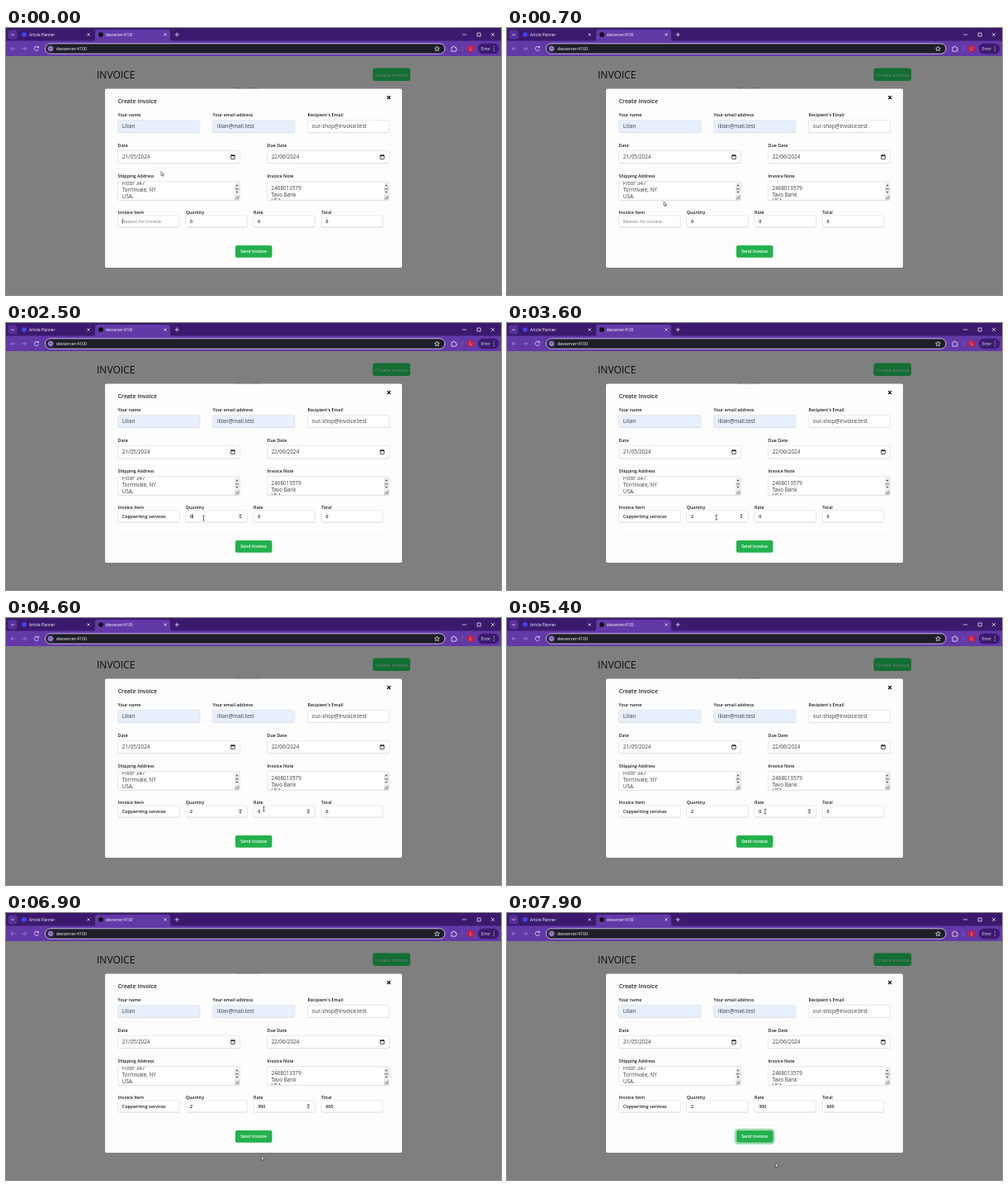
An HTML page for the animation above (8 s loop, 600x323 px).

```html
<!DOCTYPE html>
<html lang="en">
<head>
<meta charset="utf-8">
<title>Create invoice</title>
<style>
html, body { margin: 0; width: 100%; height: 100%; overflow: hidden; background: #7f7f7f; }
svg { display: block; width: 100vw; height: 100vh; }
text { font-family: "Open Sans", "Noto Sans", sans-serif; white-space: pre; }
.label { font-size: 5.3px; font-weight: 600; fill: #1c1c1c; }
.value { font-size: 6.35px; fill: #3c3c3c; }
.entry { font-size: 5.35px; font-weight: 600; fill: #1c1c1c; }
.hint { font-size: 5.5px; font-weight: 500; fill: #777; }
.tab { font-size: 4.6px; font-weight: 500; fill: #fff; }
.line { fill: none; stroke: #fff; stroke-width: .7; }
</style>
</head>
<body>
<svg id="stage" viewBox="0 0 600 323" xmlns="http://www.w3.org/2000/svg">
  <defs>
    <clipPath id="areas"><path d="M136 186h147v22H136zM317 186h147v22H317z"/></clipPath>
    <g id="calendar">
      <rect x="-2.3" y="-2" width="4.6" height="4.6" rx=".4" fill="none" stroke="#111" stroke-width=".7"/>
      <path d="M-2.3-1.4h4.6M-1.3-3v1M1.3-3v1" stroke="#111" stroke-width="1"/>
    </g>
    <g id="scroller">
      <path d="M-3-10.5h6v16h-6z" fill="#f0f0f0"/>
      <path d="M-1.8-5.6L0-7.6 1.8-5.6zM-1.8 1L0 3 1.8 1z" fill="#555"/>
      <path d="M-2.2-3.4h4.4v2.6h-4.4z" fill="#aaa"/>
      <path d="M-2.8 5.6h5.6v5.4h-5.6z" fill="#ddd"/>
      <path d="M-2 10.5L2.5 6M.3 10.5L2.5 8.3" stroke="#666" stroke-width=".8"/>
    </g>
    <g id="spinner">
      <path d="M-2.5-3.2h5v6.4h-5z" fill="#ededed"/>
      <path d="M-1.5-.7L0-2.5 1.5-.7zM-1.5.7L0 2.5 1.5.7z" fill="#444"/>
    </g>
  </defs>

  <rect width="600" height="323" fill="#7f7f7f"/>
  <rect width="600" height="17" fill="#3b1a6e"/>
  <rect y="15.5" width="600" height="18.5" fill="#6339a8"/>
  <path d="M105 16q3 0 3-3V5q0-3 3-3h85q3 0 3 3v8q0 3 3 3z" fill="#6339a8"/>
  <rect x="2.5" y="2.5" width="11" height="11" rx="3" fill="#56319a"/>
  <path class="line" d="M6.2 7.2l1.8 1.8 1.8-1.8"/>
  <rect x="19.5" y="5.5" width="5" height="5" rx="1" fill="#4945ff"/>
  <text class="tab" x="28" y="9.7">Article Planner</text>
  <circle cx="115" cy="8" r="2.8" fill="#0a0a0a"/>
  <text class="tab" x="120.7" y="9.7">devserver:4100</text>
  <path class="line" d="M98.5 6.5l3 3m0-3l-3 3M191.5 6.5l3 3m0-3l-3 3M204.7 8h5M207.2 5.5v5M553 8h5M571.2 6h4v4h-4zM588 6l4 4m0-4l-4 4"/>

  <path class="line" opacity=".45" d="M11 25H6m2.4-2.4L6 25l2.4 2.4M19.5 25h5m-2.4-2.4l2.4 2.4-2.4 2.4"/>
  <path class="line" d="M39 23.3a2.6 2.6 0 1 0 .4 2.5M39.5 22v1.8h-1.8"/>
  <rect x="47.5" y="18.8" width="484.5" height="12.4" rx="6.2" fill="#1e1e28" stroke="#cdb9ef"/>
  <circle cx="54" cy="25" r="4" fill="#533488"/>
  <circle class="line" cx="54" cy="25" r="2.2"/>
  <path class="line" d="M54 24.7v1.3"/>
  <text x="61" y="26.9" font-size="5.2" fill="#fff">devserver:4100</text>
  <path class="line" d="M522.5 22.2l.9 1.9 2 .2-1.5 1.4.4 2-1.8-1-1.8 1 .4-2-1.5-1.4 2-.2z"/>
  <path class="line" d="M540 23.3h1.6q0-1.4 1.2-1.4t1.2 1.4h1.4v1.5q1.2 0 1.2 1t-1.2 1v1.4H540z"/>
  <path d="M553 21v8" stroke="#8a67c5" stroke-width=".6"/>
  <circle cx="563.3" cy="25" r="4.2" fill="#c9213e"/>
  <text x="563.3" y="26.6" font-size="4.5" fill="#fff" text-anchor="middle">L</text>
  <rect x="572" y="18.7" width="25.5" height="12.6" rx="6.3" fill="#3b1a6e"/>
  <text x="576" y="26.7" font-size="4.7" fill="#fff">Error</text>
  <path d="M591.5 22.5v.01M591.5 25v.01M591.5 27.5v.01" stroke="#fff" stroke-linecap="round" stroke-width="1.1"/>

  <text x="110" y="60.5" font-size="12" fill="#0c0c0c">INVOICE</text>
  <rect x="444.5" y="48.5" width="45.5" height="15.5" rx="3" fill="#126e32"/>
  <text x="467.3" y="58.7" font-size="6.1" fill="#808080" text-anchor="middle">Create invoice</text>
  <text x="279.5" y="76.2" font-size="5.6" fill="#222">Invoice list</text>

  <rect x="120" y="73.5" width="360" height="216.5" rx="1.8" fill="#fdfdfd"/>
  <text x="135.7" y="91.3" font-size="6.9" font-weight="600" fill="#222">Create Invoice</text>
  <path d="M462.2 82.2l3.8 3.8m0-3.8l-3.8 3.8" stroke="#000" stroke-width="1.2"/>
  <path d="M135.5 256.5h330" stroke="#ececec" stroke-width=".6" stroke-dasharray="1.2 .8"/>
  <g id="form"></g>
  <g clip-path="url(#areas)">
    <text class="value" x="140.8" y="190.1">Floor 347</text>
    <text class="value" x="140.8" y="198.1">Torrinvale, NY</text>
    <text class="value" x="140.8" y="206">USA.</text>
    <text class="value" x="321.5" y="195.5">2468013579</text>
    <text class="value" x="321.5" y="203.5">Tavo Bank</text>
    <text class="value" x="321.5" y="211.4">USA</text>
    <use href="#scroller" x="280" y="196.8"/>
    <use href="#scroller" x="461" y="196.8"/>
  </g>
  <use href="#calendar" x="275" y="156"/>
  <use href="#calendar" x="456" y="156"/>
  <use id="spinQty" href="#spinner" x="284" y="233.8"/>
  <use id="spinRate" href="#spinner" x="366.5" y="233.8"/>
  <path id="caret" d="M0 230.8v6" stroke="#111" stroke-width=".6"/>

  <rect id="ring" x="276.7" y="261.8" width="46.6" height="17.2" rx="2.8" fill="#fff" stroke="#35b45c" stroke-width=".9"/>
  <rect x="278" y="263" width="44.5" height="14.8" rx="2" fill="#22b14c"/>
  <text x="300.1" y="272.4" font-size="5.25" font-weight="600" fill="#fff" text-anchor="middle">Send Invoice</text>

  <g id="mouse">
    <path id="arrow" d="M0 0v5l1.2-1 .8 1.9.9-.4-.8-1.8h1.5z" fill="#fff" stroke="#111" stroke-width=".5"/>
    <path id="beam" d="M-1.2-2.8h2.4M0-2.8v5.6M-1.2 2.8h2.4" stroke="#111" stroke-width=".6"/>
    <path id="hand" d="M-.6.2q.6-.6 1.1 0v2.2l2 .5q.6.2.5.9l-.4 2.2h-3l-1.7-2.2q.2-.8 1.5 0z" fill="#fff" stroke="#111" stroke-width=".5"/>
  </g>
</svg>
<script>
const $ = id => document.getElementById(id);
const form = $('form');

function add(tag, attrs, text) {
  const el = document.createElementNS('http://www.w3.org/2000/svg', tag);
  for (const k in attrs) el.setAttribute(k, attrs[k]);
  if (text) el.textContent = text;
  return form.appendChild(el);
}

// Labelled input box; returns its text element.
function field(label, x, y, w, h, value = '', fill = '#fff', cls = 'value') {
  const small = cls === 'entry';
  add('text', { class: 'label', x, y: y - (small ? 1.8 : 5) }, label);
  add('rect', { x: x + .1, y: y + .8, width: w, height: h, rx: 1.6, fill: '#dcdcdc' });
  add('rect', { x, y, width: w, height: h, rx: 1.6, fill, stroke: '#dfe2e7', 'stroke-width': .7 });
  return add('text', { class: cls, x: x + 5.2, y: y + h / 2 + (small ? 2 : 2.4) }, value);
}

field('Your name', 135.6, 111.5, 99.4, 14.8, 'Lilian', '#e8f0fe');
field('Your email address', 250.6, 111.5, 99.4, 14.8, 'lilian@mail.test', '#e8f0fe');
field("Recipient's Email", 365.6, 111.5, 99, 14.8, 'our-shop@invoice.test');
field('Date', 135.6, 148.5, 148, 15, '21/05/2024');
field('Due Date', 316.5, 148.5, 148, 15, '22/06/2024');
field('Shipping Address', 135.6, 185.5, 148, 22.8);
field('Invoice Note', 316.5, 185.5, 148, 22.8);
const [item, qty, rate, total] = ['Invoice Item', 'Quantity', 'Rate', 'Total'].map(
  (name, i) => field(name, 135.6 + i * 82.2, 226.8, 74.5, 14, '', '#fff', 'entry'));

const LOOP = 8000;
const SERVICE = 'Copywriting services';
// time, x, y
const path = [
  [0, 188, 173.5], [200, 188, 175], [1000, 191, 226], [1500, 189, 235.4], [2150, 190, 235.4],
  [2450, 239.5, 236], [3400, 239.5, 236], [4100, 311, 232], [4600, 312.5, 231],
  [5000, 313, 234], [6300, 313, 234], [6900, 309.5, 294], [7050, 309, 295],
  [7300, 304, 271], [7500, 304, 271], [7900, 325.5, 302.5], [8000, 325.5, 302.5]
];
const areas = [
  [135, 111, 465, 127], [135, 148, 284, 164], [316, 148, 465, 164], [135, 185, 284, 209],
  [135, 226, 211, 241], [217, 226, 293, 241], [300, 226, 375, 241], [382, 226, 457, 241]
];
const inside = (x, y, [l, t, r, b]) => x > l && x < r && y > t && y < b;
const show = (el, on) => { el.style.display = on ? '' : 'none'; };
// Latest value of a list of [time, value] steps.
const step = (t, list) => list.filter(s => s[0] <= t).pop()[1];

function pointer(t) {
  const i = path.findIndex(p => p[0] > t);
  const [t0, x0, y0] = path[i - 1], [t1, x1, y1] = path[i];
  const u = (t - t0) / (t1 - t0), e = u * u * (3 - 2 * u);
  return [x0 + (x1 - x0) * e, y0 + (y1 - y0) * e];
}

function draw(now) {
  const t = now % LOOP;
  const [x, y] = pointer(t);
  const typed = SERVICE.slice(0, Math.max(0, Math.floor((t - 1600) / 27)));
  item.textContent = typed || 'Reason for invoice';
  item.setAttribute('class', typed ? 'entry' : 'hint');
  qty.textContent = step(t, [[0, '0'], [3000, '2']]);
  rate.textContent = step(t, [[0, '0'], [5500, '3'], [5800, '30'], [6200, '300']]);
  total.textContent = step(t, [[0, '0'], [5600, '6'], [5900, '60'], [6300, '600']]);

  const focus = step(t, [[0, item], [2450, qty], [4800, rate], [7400, null]]);
  const lit = step(t, [0, 1600, 2100, 2450, 3000, 4800, 5500, 5800, 6200].map(k => [k, k]));
  show($('caret'), focus && Math.floor((t - lit) / 500) % 2 === 0);
  if (focus) {
    const end = focus === item && !typed ? 0 : focus.getComputedTextLength();
    $('caret').setAttribute('transform', `translate(${+focus.getAttribute('x') + end + .3})`);
  }
  show($('spinQty'), focus === qty || inside(x, y, areas[5]));
  show($('spinRate'), focus === rate || inside(x, y, areas[6]));
  show($('ring'), t >= 7400);

  const beam = areas.some(a => inside(x, y, a));
  const hand = inside(x, y, [278, 263, 322, 277]);
  show($('beam'), beam);
  show($('hand'), hand);
  show($('arrow'), !beam && !hand);
  $('mouse').setAttribute('transform', `translate(${x} ${y})`);
}

const start = performance.now();
function tick() {
  draw(performance.now() - start);
  requestAnimationFrame(tick);
}
tick();
</script>
</body>
</html>
```
